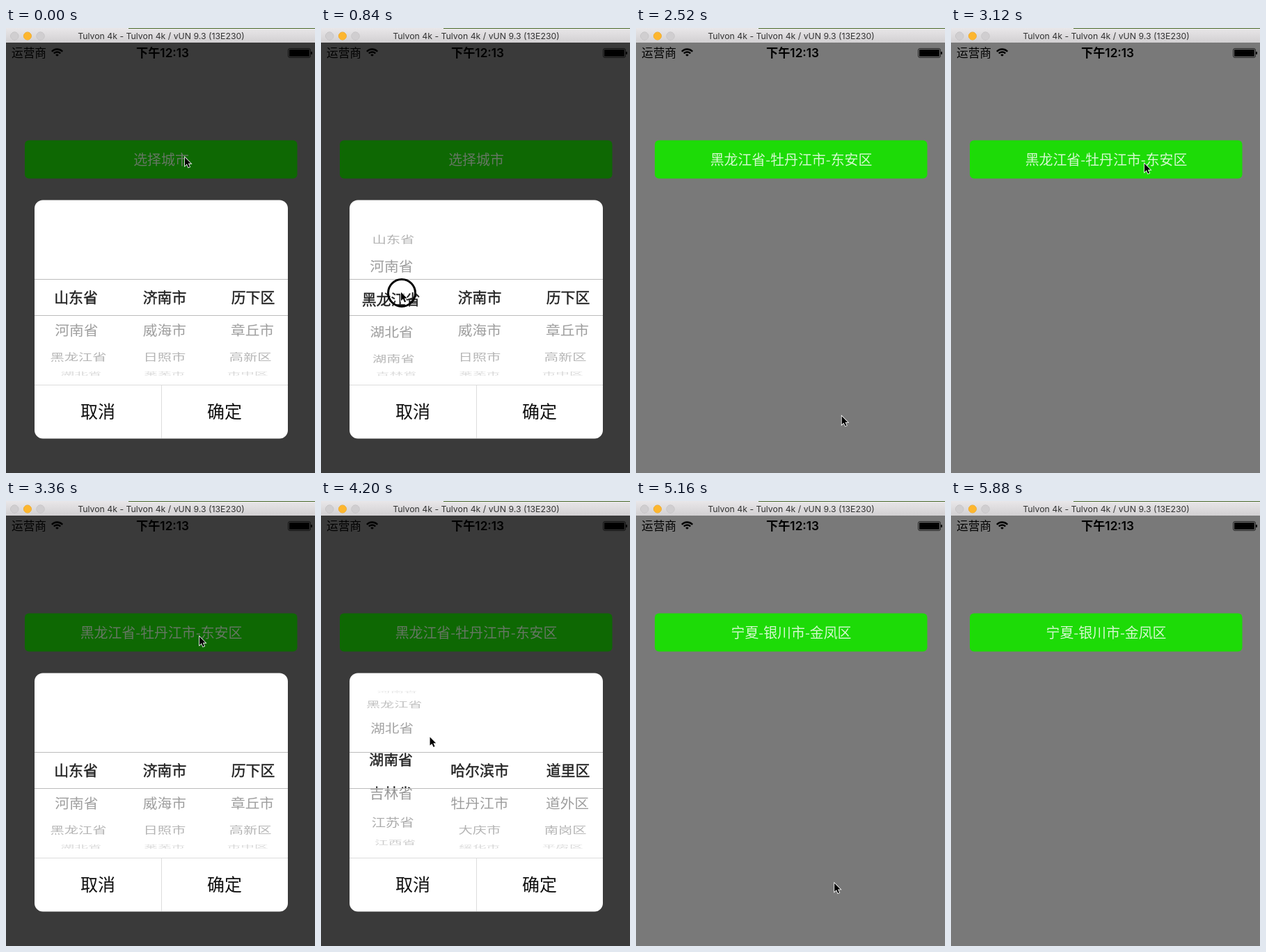
These frames come from a looping animation (444x640 px, 6 s). An HTML page with a canvas:

```html
<!DOCTYPE html>
<html lang="zh-CN">
<head>
<meta charset="utf-8">
<title>选择城市</title>
<style>
html, body { margin: 0; width: 100%; height: 100%; overflow: hidden; background: #797979; }
canvas { display: block; }
</style>
</head>
<body>
<canvas id="stage" width="444" height="640"></canvas>
<script>
const g = document.getElementById('stage').getContext('2d');
const CJK = '"Noto Sans CJK SC", "Noto Sans CJK", sans-serif';
const UI = 'Inter, ' + CJK;
const LOOP = 6000, STEP = 120;
const CONFIRM = 2400, REOPEN = 3240, CONFIRM_AGAIN = 5160;

const provinces = '山东省 河南省 黑龙江省 湖北省 湖南省 吉林省 江苏省 江西省 辽宁省 内蒙古 宁夏 青海省 山西省 陕西省'.split(' ');
const heilongjiang = '哈尔滨市 牡丹江市 大庆市 绥化市 齐齐哈尔市 鸡西市';
const regions = {
  shandong: ['济南市 威海市 日照市 莱芜市 青岛市', '历下区 章丘市 高新区 市中区 天桥区'],
  harbin: [heilongjiang, '道里区 道外区 南岗区 平房区 香坊区'],
  mudanjiang: [heilongjiang, '东安区 爱民区 阳明区 西安区'],
  ningxia: ['银川市 石嘴山市 吴忠市 固原市 中卫市', '金凤区 兴庆区 西夏区 灵武市']
};

// Pointer legs: arrival time, x, y, pressed on the way
const legs = [
  [0, 257, 186], [360, 110, 470], [840, 115, 380, true],
  [1320, 240, 455], [1680, 250, 391, true],
  [2280, 296, 565], [CONFIRM, 296, 565, true],
  [3120, 278, 195], [REOPEN, 278, 195, true], [3360, 278, 195],
  [3600, 145, 450], [3840, 150, 360, true],
  [3960, 150, 450], [4080, 155, 337, true],
  [4920, 285, 547], [5040, 285, 547, true], [5700, 290, 660]
];

// Cubic ease in and out, 0 to 1 between two times
function ease(t, from, to) {
  const p = Math.min(1, Math.max(0, (t - from) / (to - from)));
  return p < 0.5 ? 4 * p ** 3 : 1 - 4 * (1 - p) ** 3;
}

const provinceAt = t => t < CONFIRM
  ? 2 * ease(t, 360, 960)
  : 2 * ease(t, 3600, 3840) + 8 * ease(t, 3900, 4620);

// The city wheel is dragged past its row and springs back
const cityAt = t => t < CONFIRM ? 1.32 * ease(t, 1320, 1680) - 0.32 * ease(t, 1680, 1920) : 0;

function regionAt(t) {
  if (t < CONFIRM) return t < 960 ? 'shandong' : t < 1920 ? 'harbin' : 'mudanjiang';
  return t < 3960 ? 'shandong' : t < 4680 ? 'harbin' : 'ningxia';
}

function text(str, x, y, size, color, font = CJK, weight = 400) {
  g.font = `${weight} ${size}px ${font}`;
  g.textAlign = 'center';
  g.fillStyle = color;
  g.fillText(str, x, y + size * 0.37);
}

function box(x, y, w, h, r, color) {
  g.fillStyle = color;
  g.beginPath();
  g.roundRect(x, y, w, h, r);
  g.fill();
}

function rect(x, y, w, h, color) {
  g.fillStyle = color;
  g.fillRect(x, y, w, h);
}

function ring(x, y, r, line, width) {
  g.beginPath();
  g.arc(x, y, r, 0, 7);
  g.strokeStyle = line;
  g.lineWidth = width;
  g.stroke();
}

function titleBar() {
  const grad = g.createLinearGradient(0, 0, 0, 21);
  grad.addColorStop(0, '#e9e7e9');
  grad.addColorStop(1, '#d2d0d2');
  rect(0, 0, 444, 21, grad);
  rect(176, 0, 268, 1, '#4a6a2a');
  ['#d0ced0', '#fdb62e', '#d0ced0'].forEach((color, i) => {
    const x = 12.3 + i * 18.6;
    ring(x, 11.5, 5.5, i === 1 ? '#e2a028' : '#b6b4b6', 1);
    g.fillStyle = color;
    g.fill();
  });
  text('Tulvon 4k - Tulvon 4k / vUN 9.3 (13E230)', 223, 11.5, 12.3, '#333', UI);
}

function statusBar() {
  text('运营商', 33, 36, 16.7, '#000');
  text('下午12:13', 225, 36, 17.2, '#000', UI, 600);
  g.strokeStyle = '#000';
  g.lineWidth = 2.4;
  for (const r of [2, 6.5, 10.5]) {
    g.beginPath();
    g.arc(73.5, 41, r, -Math.PI * 0.76, -Math.PI * 0.24);
    g.stroke();
  }
  g.strokeStyle = 'rgba(0,0,0,.7)';
  g.lineWidth = 1;
  g.beginPath();
  g.roundRect(405.5, 29.5, 32, 13, 2.5);
  g.stroke();
  box(407, 31, 29, 10, 1, '#000');
  box(438, 34, 2, 4, 1, '#000');
}

// Rows sit on a drum seen from the front
function wheel(items, pos, x, selected) {
  items.forEach((item, i) => {
    const a = (i - pos) * 0.426;
    if (Math.abs(a) > 1.54) return;
    const c = Math.cos(a), s = 1 - 0.085 * (1 - c);
    g.save();
    g.translate(224 + (x - 224) * s, 387.5 + 114 * Math.sin(a));
    g.scale(s, s * c);
    g.globalAlpha = selected ? 1 : 0.1 + 0.8 * c;
    text(item, 0, 0, 20.9, selected ? '#222' : '#888');
    if (selected) {
      g.strokeStyle = '#222';
      g.lineWidth = 0.4;
      g.strokeText(item, 0, 20.9 * 0.37);
    }
    g.restore();
  });
}

function dialog(t) {
  rect(0, 21, 444, 619, 'rgba(0,0,0,.52)');
  box(41, 247.5, 364, 343, 12, '#fff');
  const [cities, districts] = regions[regionAt(t)].map(s => s.split(' '));
  for (const selected of [false, true]) {
    g.save();
    g.beginPath();
    if (selected) g.rect(41, 362, 364, 51);
    else {
      g.rect(41, 262, 364, 99);
      g.rect(41, 414, 364, 99);
    }
    g.clip();
    wheel(provinces, provinceAt(t), 100.5, selected);
    wheel(cities, cityAt(t), 228, selected);
    wheel(districts, 0, 355, selected);
    g.restore();
  }
  rect(41, 361, 364, 1, '#bcbcbc');
  rect(41, 413, 364, 1, '#bcbcbc');
  rect(41, 513, 364, 1, '#dcdcdc');
  rect(223, 514, 1, 76, '#dcdcdc');
  text('取消', 132, 552, 25, '#111');
  text('确定', 314, 552, 25, '#111');
}

function cursor(t) {
  const n = legs.findIndex(leg => leg[0] >= t);
  if (n < 0) return;
  const [end, x1, y1, pressed] = legs[n], [begin, x0, y0] = legs[Math.max(0, n - 1)];
  const p = n ? ease(t, begin, end) : 0;
  const x = x0 + (x1 - x0) * p, y = y0 + (y1 - y0) * p;
  if (pressed) ring(x + 1, y + 1, 19.5, '#000', 3);
  g.save();
  g.translate(x, y);
  g.scale(0.9, 0.9);
  g.lineWidth = 1.8;
  g.strokeStyle = '#fff';
  g.fillStyle = '#000';
  const arrow = new Path2D('M0 0V13.5L3.2 10.6L5.6 16L7.8 15L5.4 9.8H9.6Z');
  g.stroke(arrow);
  g.fill(arrow);
  g.restore();
}

function draw(t) {
  rect(0, 0, 444, 640, '#797979');
  titleBar();
  box(27, 161.5, 391.5, 55, 6, '#1ddb07');
  const label = t < CONFIRM ? '选择城市' : t < CONFIRM_AGAIN ? '黑龙江省-牡丹江市-东安区' : '宁夏-银川市-金凤区';
  text(label, 223, 189.5, 19.9, '#d6f8d0', CJK, 300);
  if (t < CONFIRM || t >= REOPEN && t < CONFIRM_AGAIN) dialog(t);
  statusBar();
  cursor(t);
}

const start = performance.now();
function loop() {
  const t = (performance.now() - start) % LOOP;
  draw(Math.floor(t / STEP) * STEP);
  requestAnimationFrame(loop);
}
loop();
</script>
</body>
</html>
```
